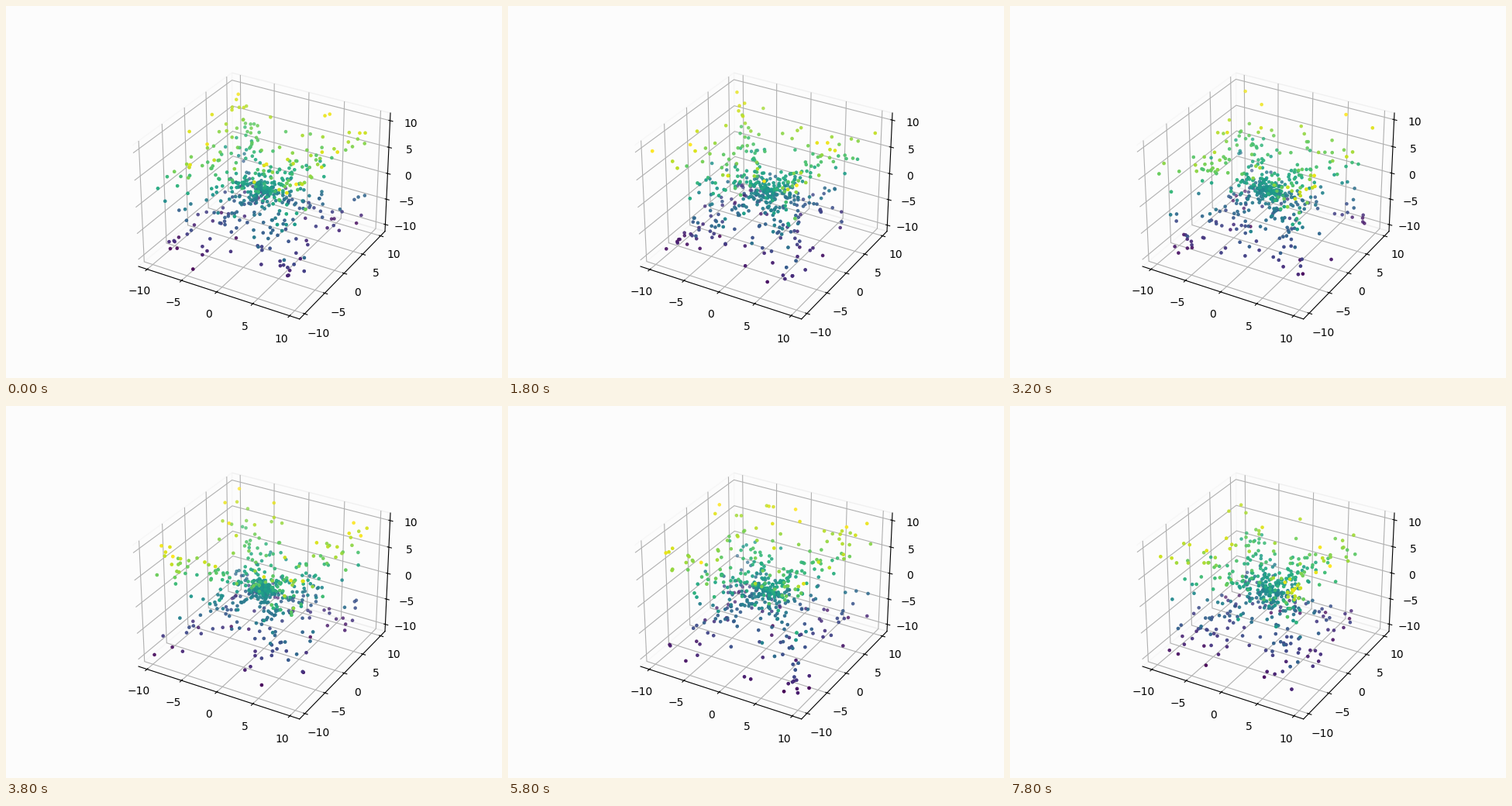
A matplotlib script for the animation above (8000 ms loop, 640 by 480 pixels).

```python
import numpy as np
import matplotlib.pyplot as plt
from matplotlib.animation import FuncAnimation

FRAMES, STEP_MS = 40, 200
COUNT = 500
REACH = 10
PAPER = "#fcfcfc"

fig = plt.figure(figsize=(6.4, 4.8), dpi=100, facecolor=PAPER)
ax = fig.add_subplot(projection="3d", facecolor=PAPER)


def cloud(frame):
    """Points on random radii, pulled towards the corners of a cube."""
    rng = np.random.default_rng(100 + frame)
    radius = rng.uniform(0, REACH, COUNT)
    wave = np.sin(rng.uniform(0, 2 * np.pi, (3, COUNT)))
    pts = radius * np.sign(wave) * np.abs(wave) ** 0.7
    # Stretch each axis so that its extremes fall just short of the reach.
    for p in pts:
        low, high = REACH - rng.uniform(0.02, 0.22, 2)
        p *= np.where(p < 0, -low / p.min(), high / p.max())
    return pts


def draw(frame):
    ax.clear()
    for axis in (ax.xaxis, ax.yaxis, ax.zaxis):
        axis.pane.fill = False
    x, y, z = cloud(frame)
    # Two layers soften the depth fading.
    return [ax.scatter(x, y, z, c=z, cmap="viridis", marker=".")
            for _ in range(2)]


anim = FuncAnimation(fig, draw, frames=FRAMES, interval=STEP_MS,
                     init_func=lambda: draw(0), repeat=True, repeat_delay=0)
plt.show()
```
